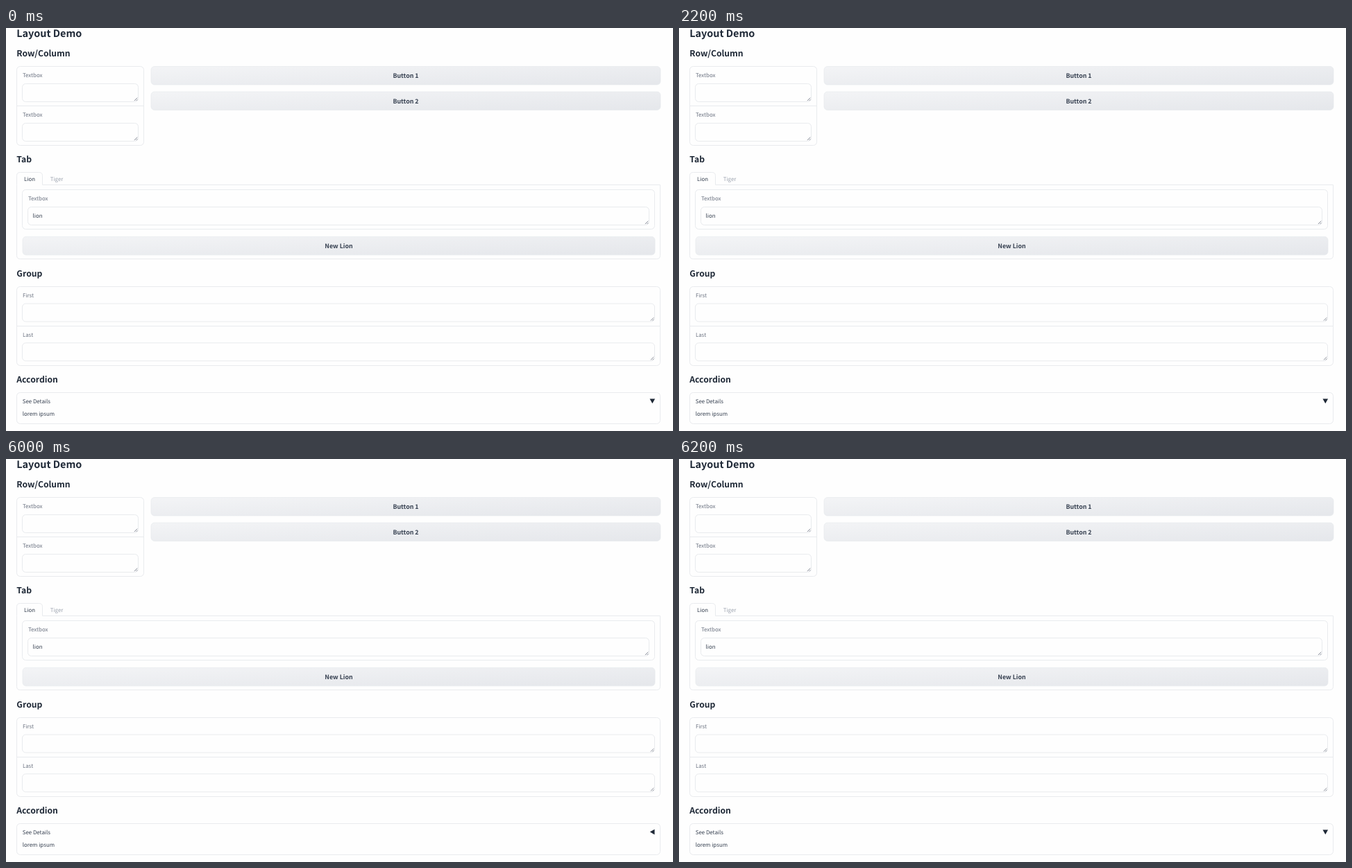
Write an HTML page that moves like this. It is 961 px wide and 582 px high and loops after 8 s.

```html
<!DOCTYPE html>
<html lang="en">
<head>
<meta charset="utf-8">
<title>Layout Demo</title>
<style>
  html, body { margin: 0; width: 100%; height: 100%; overflow: hidden; background: #fefefe; }
  svg { display: block; }
  text {
    font: 7.9px "Noto Sans CJK SC", "Noto Sans CJK JP", "Noto Sans CJK", "Source Sans Pro", sans-serif;
    text-rendering: geometricPrecision; white-space: pre; fill: #374151;
  }
  .title { font-size: 14.4px; font-weight: 600; fill: #1f2937; }
  .heading { font-size: 12.15px; font-weight: 600; fill: #1f2937; }
  .button { font-size: 8.85px; font-weight: 600; text-anchor: middle; }
  .label { fill: #6b7280; }
  .muted { fill: #9ca3af; }
  .footer { font-size: 8.8px; fill: #9ca3af; }
  .footer tspan { font-size: 7.9px; }
  .line { fill: none; stroke: #e9ebee; }
  .grip { fill: none; stroke: #6b7280; stroke-width: .8; }
</style>
</head>
<body>
<svg id="stage" width="961" height="582" viewBox="0 0 961 582">
  <defs>
    <linearGradient id="face" x1="0" y1="0" x2="1" y2="1">
      <stop stop-color="#f3f4f6"/><stop offset="1" stop-color="#e5e7eb"/>
    </linearGradient>
  </defs>
  <g id="page"></g>
</svg>
<script>
const page = document.getElementById('page');
const LOOP = 8000, SHIFT = 12.6;

const text = (x, y, str, cls = '') => `<text x="${x}" y="${y}" class="${cls}">${str}</text>`;
const path = (d, cls = 'line') => `<path d="${d}" class="${cls}"/>`;
const box = (x1, y1, x2, y2, r = 5) =>
  `<rect x="${x1}" y="${y1}" width="${x2 - x1}" height="${y2 - y1}" rx="${r}" class="line"/>`;

const button = (x1, y, x2, str) =>
  `<rect x="${x1}" y="${y}" width="${x2 - x1}" height="26.5" rx="5" fill="url(#face)" stroke="#e5e7eb" stroke-width=".6"/>`
  + text((x1 + x2) / 2, y + 16.9, str, 'button');

// A labelled text area with its resize grip; y is the top of the area.
const field = (x1, y, x2, label, value = '') => {
  const b = y + 26;
  return text(x1 + .4, y - 9.2, label, 'label') + box(x1, y, x2, b)
    + path(`M${x2 - 5.6} ${b - 1.4}l4.4-4.4M${x2 - 3} ${b - 1.4}l1.8-1.8`, 'grip')
    + text(x1 + 7, y + 15.1, value);
};

const tabs = name => {
  const lion = name === 'Lion';
  const [left, right] = lion ? [15.5, 52.5] : [53.5, 92.5];
  return path(`M15.5 226.5H${left}V213.5q0-5 5-5H${right - 5}q5 0 5 5V226.5H942.5V328.5q0 5-5 5H20.5q-5 0-5-5Z`
      .replace('Z', 'V226.5'))
    + text(26, 221.2, 'Lion', lion ? '' : 'muted')
    + text(63.7, 221.2, 'Tiger', lion ? 'muted' : '')
    + box(23.5, 233.5, 934.5, 290.5)
    + field(31.5, 258.5, 926.5, 'Textbox', name.toLowerCase())
    + button(24, 301.3, 935, 'New ' + name);
};

const accordion = (open, angle) =>
  box(15.5, 526.5, 942.5, open ? 571.5 : 552)
  + text(23.7, 541.8, 'See Details')
  + `<path d="M-3.8-3.2H3.8L0 3.6Z" fill="#1f2937" transform="translate(931.3 538.6) rotate(${angle})"/>`
  + (open ? text(23.7, 560, 'lorem ipsum') : footer);

const footer = text(401, 571.6, '通过<tspan> API </tspan>使用', 'footer')
  + '<path d="M459 571l1-4 5-3.2-1 5-3 2.2Z" fill="#4b5563"/>'
  + text(472, 571.6, '·', 'footer')
  + text(479, 571.6, '使用<tspan> Gradio </tspan>构建', 'footer')
  + '<circle cx="550" cy="568.6" r="4" fill="#f5a623"/>';

const fixed = text(15.3, 12.5, 'Layout Demo', 'title')
  + [['Row/Column', 41], ['Tab', 194], ['Group', 358.6], ['Accordion', 511.6]]
    .map(([str, y]) => text(15.3, y, str, 'heading')).join('')
  + box(15.5, 55.5, 198.5, 169.5) + path('M15.5 112.5H198.5')
  + field(23.5, 80.5, 190.5, 'Textbox') + field(23.5, 137.5, 190.5, 'Textbox')
  + button(209, 55.5, 943, 'Button 1') + button(209, 92, 943, 'Button 2')
  + box(15.5, 373.5, 942.5, 487.5) + path('M15.5 430.5H942.5')
  + field(23.5, 398, 934.5, 'First') + field(23.5, 454.8, 934.5, 'Last');

const arrowAngle = t =>
  t < 4600 ? 0 : t < 4700 ? -90 : t < 6100 ? 90 : t < 6200 ? 20 : 0;

let shown = '';
function draw() {
  const t = performance.now() % LOOP;
  const tab = t >= 500 && t < 2100 ? 'Tiger' : 'Lion';
  const open = t < 4600 || t >= 6000;
  const angle = arrowAngle(t);
  const state = [tab, open, angle].join();
  if (state !== shown) {
    shown = state;
    page.innerHTML = fixed + tabs(tab) + accordion(open, angle);
    page.setAttribute('transform', `translate(0 ${open ? 0 : SHIFT})`);
  }
  requestAnimationFrame(draw);
}
draw();
</script>
</body>
</html>
```
